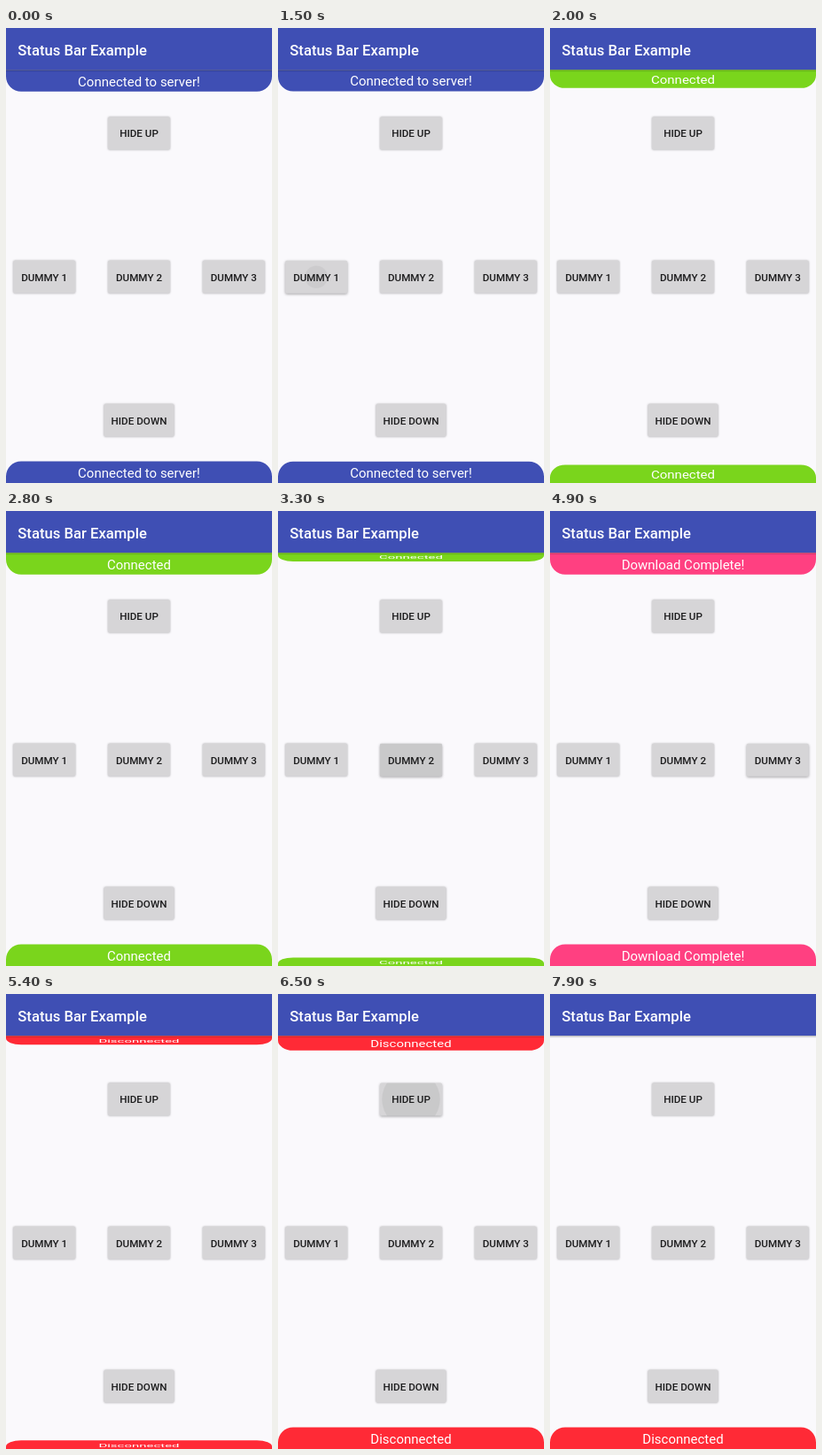
An HTML page that plays this animation: 300 px wide and 514 px high, repeating every 8000 ms.

```html
<!DOCTYPE html>
<html lang="en">
<head>
<meta charset="utf-8">
<title>Status bars</title>
<style>
  html, body { margin: 0; width: 100%; height: 100%; overflow: hidden; background: #faf9fc; }
  svg { display: block; }
  text { font-family: Roboto, sans-serif; }
  .title { font-size: 16.67px; font-weight: 500; fill: #fff; }
  .label { font-size: 11.67px; font-weight: 500; fill: #1c1c1d; text-anchor: middle; }
  .message { font-size: 15px; fill: #fff; text-anchor: middle; }
  .appbar { fill: #3f4fb4; filter: drop-shadow(0 1.2px 1.3px rgba(0, 0, 0, .35)); }
</style>
</head>
<body>
<svg id="stage" width="100%" height="100%" viewBox="0 0 300 514">
  <g id="bars"></g>
  <rect class="appbar" x="-5" y="-5" width="310" height="52"/>
  <text class="title" x="13.3" y="30.6">Status Bar Example</text>
  <g id="buttons"></g>
</svg>
<script>
const LOOP = 8000, SCALE_TIME = 300, BAR_H = 24.5;
const $ = id => document.getElementById(id);
const clamp = v => Math.max(0, Math.min(1, v));
const ease = p => (1 - Math.cos(Math.PI * clamp(p))) / 2;

function add(parent, tag, attrs, text = '') {
  const el = document.createElementNS('http://www.w3.org/2000/svg', tag);
  for (const key in attrs) el.setAttribute(key, attrs[key]);
  el.textContent = text;
  return parent.appendChild(el);
}

// Each state takes over halfway through the change started by its click.
const states = [
  { click: -2000, text: 'Connected to server!', color: '#3f4fb4' },
  { click: 1480, text: 'Connected', color: '#7ad51c' },
  { click: 3130, text: 'Download Complete!', color: '#ff4081' },
  { click: 4970, text: 'Disconnected', color: '#ff2a36' }
];
const HIDE_UP = 6385;

function makeBar(path, baseline) {
  const group = add($('bars'), 'g', {});
  return {
    group,
    shape: add(group, 'path', { d: path }),
    text: add(group, 'text', { class: 'message', x: 150, y: baseline })
  };
}
const topBar = makeBar(`M0 0H300V${BAR_H - 17}a17 17 0 0 1-17 17H17a17 17 0 0 1-17-17Z`, 18.3);
const bottomBar = makeBar(`M0 0V-${BAR_H - 17}a17 17 0 0 1 17-17H283a17 17 0 0 1 17 17V0Z`, 18.3 - BAR_H);

function setBar(bar, y, scale, state) {
  bar.group.setAttribute('transform', `translate(0 ${y}) scale(1 ${scale})`);
  bar.group.style.display = scale > 0.01 ? '' : 'none';
  bar.shape.setAttribute('fill', state.color);
  if (bar.text.textContent !== state.text) bar.text.textContent = state.text;
}

function makeButton(label, cx, y, width, click) {
  const group = add($('buttons'), 'g', {});
  const x = cx - width / 2, height = 37;
  const face = add(group, 'rect', { x, y, width, height, rx: 1.7, fill: '#d6d5d7' });
  const clip = add(group, 'svg', { x, y, width, height, overflow: 'hidden' });
  const ripple = add(clip, 'circle', { cx: width / 2, cy: height / 2, r: 0 });
  add(group, 'text', { class: 'label', x: cx, y: y + 22.9 }, label);
  return { face, ripple, click };
}
const buttons = [
  makeButton('HIDE UP', 150, 100.5, 70, HIDE_UP),
  makeButton('DUMMY 1', 43.2, 262.8, 70, states[1].click),
  makeButton('DUMMY 2', 150, 262.8, 70, states[2].click),
  makeButton('DUMMY 3', 256.8, 262.8, 70, states[3].click),
  makeButton('HIDE DOWN', 150, 424.8, 79, Infinity)
];

function drawButton({ face, ripple, click }, t) {
  const dt = t - click;
  const lift = Math.min(clamp((dt + 170) / 100), clamp((300 - dt) / 150));
  const alpha = 0.06 * Math.min(clamp((dt + 40) / 80), clamp((400 - dt) / 200));
  face.style.filter =
    `drop-shadow(0 ${0.8 + lift}px ${0.8 + lift}px rgba(0, 0, 0, ${0.3 + 0.05 * lift}))`;
  ripple.setAttribute('r', Math.min(60, Math.max(0, (dt + 40) * 0.21)));
  ripple.setAttribute('opacity', alpha);
}

function draw(t) {
  let i = states.length - 1;
  while (t < states[i].click) i--;
  const p = (t - states[i].click) / SCALE_TIME;
  const shown = p < 1 ? states[Math.max(0, i - 1)] : states[i];
  const scale = p < 1 ? 1 - ease(p) : ease(p - 1);
  const topScale = scale * (1 - ease((t - HIDE_UP) / SCALE_TIME));
  setBar(topBar, 47.3, topScale, shown);
  setBar(bottomBar, 514, scale, shown);
  buttons.forEach(b => drawButton(b, t));
}

function tick() {
  draw(performance.now() % LOOP);
  requestAnimationFrame(tick);
}
tick();
</script>
</body>
</html>
```
